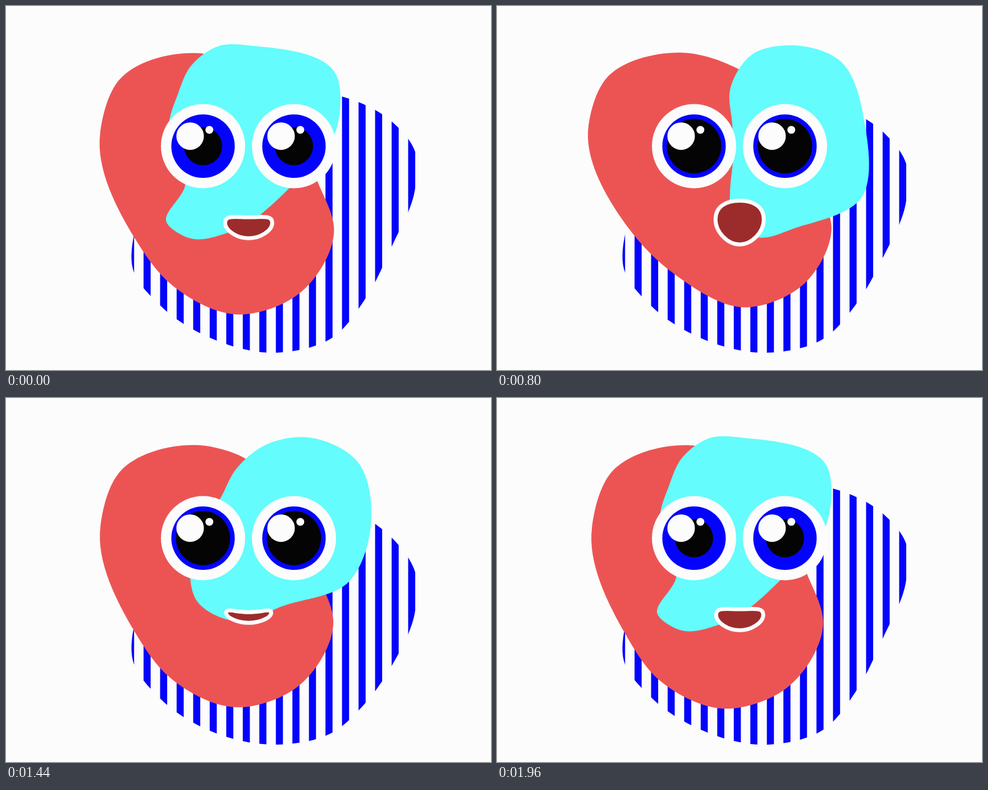
Animation of 864 by 648 pixels, one loop 2 s. Source, as an HTML page with a canvas:

```html
<!DOCTYPE html>
<html lang="en">
<head>
<meta charset="utf-8">
<title>Morphing face</title>
<style>
  html, body { margin: 0; width: 100%; height: 100%; overflow: hidden; background: #fcfcfc; }
  canvas { display: block; }
</style>
</head>
<body>
<canvas id="stage" width="864" height="648"></canvas>
<script>
const ctx = document.getElementById('stage').getContext('2d');
const LOOP = 2000, STEP = 40;
const PAPER = '#fcfcfc', RED = '#ec5454', CYAN = '#64fcfc', BLUE = '#0404fc',
      BLACK = '#040404', MAROON = '#9c2c2c', LASH = '#2c0404', LOWER_LID = '#bc3c3c';

// Key points (x, y) of closed smooth curves
const backdrop = [545,148, 628,164, 687,197, 729,250, 729,313, 687,419, 640,517, 582,589,
  485,617, 363,590, 274,532, 226,468, 229,403, 330,270, 440,180];

const redLow = [340,84, 204,132, 169,232, 228,419, 290,503, 404,553, 520,513, 581,400, 553,315, 407,98];
const redHigh = [330,83, 192,130, 162,212, 236,393, 318,472, 452,534, 552,491, 598,392, 570,320, 425,110];

const tail = [440,71, 380,71, 330,106, 305,160, 291,204, 319,320,
  286,385, 326,413, 400,402, 505,324, 590,215, 588,122];
const lean = [480,69, 415,75, 360,102, 318,155, 270,222, 275,295,
  272,370, 320,410, 410,372, 470,328, 608,240, 617,133];
const horn = [585,74, 512,113, 483,172, 383,140, 257,212, 238,300,
  300,362, 385,392, 520,356, 620,327, 655,195, 635,105];
const side = [526,70, 455,86, 415,150, 419,210, 421,260, 415,335,
  417,387, 465,412, 532,395, 650,340, 656,215, 608,95];
const wide = [548,70, 470,79, 400,101, 330,153, 260,212, 240,262,
  262,334, 345,383, 440,345, 555,312, 637,237, 643,130];

// Mouths: half width, then heights of top, corner pull, sides and bottom
const grin = [42, 376, 372, 386, 413.5];
const lens = [34, 371.5, 372, 380, 394.5];
const gasp = [34, 362, 363, 381, 414.5];
const shout = [43, 346.5, 358, 380, 424.5];
const pout = [16.5, 379, 379.5, 383, 387];
const smile = [64, 382, 368, 381, 413.5];

// Tracks: [time, values]
const patch = [[0, tail], [320, lean], [520, horn], [800, side], [1240, side], [1640, wide], [1960, tail]];
const mouth = [[0, grin], [320, lens], [520, gasp], [800, shout], [1240, pout], [1640, smile], [1960, grin]];
const redLift = [[0, [.2]], [540, [1]], [1700, [0]], [1960, [0]]];
const sag = [[0, [9]], [420, [0]], [800, [28]], [1240, [70]], [1640, [31]], [1960, [9]]];
const pupil = [[0, [34]], [320, [36]], [520, [46]], [1240, [50]], [1640, [44.5]], [1960, [34]]];
const blink = [[0, [0]], [1000, [0]], [1200, [1]], [1280, [1]], [1480, [0]]];

// Monotone cubic interpolation on a cyclic track
function at(track, t) {
  const n = track.length;
  const key = k => {
    const [time, vals] = track[(k + n) % n];
    return [time + LOOP * Math.floor(k / n), vals];
  };
  let i = n - 1;
  while (track[i][0] > t) i--;
  const [p, a, b, q] = [i - 1, i, i + 1, i + 2].map(key);
  const span = b[0] - a[0], s = (t - a[0]) / span;
  const slope = (u, v, j) => (v[1][j] - u[1][j]) / (v[0] - u[0]);
  const bend = (m, k) => m * k > 0 ? 2 * m * k / (m + k) : 0;
  return a[1].map((v, j) => {
    const m = slope(a, b, j);
    const m0 = bend(slope(p, a, j), m) * span, m1 = bend(m, slope(b, q, j)) * span;
    return v + s * m0 + s * s * (3 * m * span - 2 * m0 - m1) + s * s * s * (m0 + m1 - 2 * m * span);
  });
}

// Closed curve through the points, with tangents weighted by distance
function blob(flat) {
  const n = flat.length / 2;
  const pt = i => { const k = (i + n) % n; return [flat[2 * k], flat[2 * k + 1]]; };
  const dist = (a, b) => Math.hypot(b[0] - a[0], b[1] - a[1]);
  const tangent = i => {
    const a = pt(i - 1), b = pt(i), c = pt(i + 1), l0 = dist(a, b), l1 = dist(b, c);
    return [0, 1].map(k => ((b[k] - a[k]) / l0 * l1 + (c[k] - b[k]) / l1 * l0) / (l0 + l1));
  };
  ctx.beginPath();
  ctx.moveTo(...pt(0));
  for (let i = 0; i < n; i++) {
    const a = pt(i), b = pt(i + 1), h = dist(a, b) / 3, u = tangent(i), v = tangent(i + 1);
    ctx.bezierCurveTo(a[0] + u[0] * h, a[1] + u[1] * h, b[0] - v[0] * h, b[1] - v[1] * h, ...b);
  }
  ctx.closePath();
}

function fill(color) {
  ctx.fillStyle = color;
  ctx.fill();
}

function disc(x, y, r, color) {
  ctx.beginPath();
  ctx.arc(x, y, r, 0, 2 * Math.PI);
  fill(color);
}

function drawBackdrop(t) {
  const [depth] = at(sag, t);
  // The right side sinks, while the left and the bottom stay in place
  const sunk = backdrop.map((v, i) => {
    if (i % 2 === 0) return v;
    const pull = (backdrop[i - 1] - 230) / 500;
    return v + depth * pull * Math.min(.75 + v / 700, (617 - v) / 170);
  });
  ctx.save();
  blob(sunk);
  ctx.clip();
  ctx.fillStyle = BLUE;
  for (let i = 0; i < 18; i++) ctx.fillRect(215.6 + 29.46 * i, 0, 12.6, 648);
  ctx.restore();
}

function lid(left, bend, right, far, shift, color) {
  ctx.beginPath();
  ctx.moveTo(-77, far);
  ctx.lineTo(-77, left + shift);
  ctx.quadraticCurveTo(0, bend + shift, 77, right + shift);
  ctx.lineTo(77, far);
  fill(color);
}

function eye(x, flip, t) {
  const [r] = at(pupil, t), [shut] = at(blink, t);
  ctx.save();
  ctx.translate(x, 249.5);
  disc(0, 0, 75, PAPER);
  disc(0, 0, 56.5, BLUE);
  disc(0, 0, r, BLACK);
  disc(-23, -17.8, 24.5, PAPER);
  disc(11.3, -29, 7, PAPER);
  if (shut > 0) {
    ctx.beginPath();
    ctx.arc(0, 0, 75, 0, 2 * Math.PI);
    ctx.clip();
    ctx.scale(flip, 1);
    const up = (shut - 1) * 100, down = (1 - shut) * 60;
    lid(37, 17, 30, 140, down, LASH);
    lid(40, 20, 33, 140, down, LOWER_LID);
    lid(20, .5, 13.5, -190, up, LASH);
    lid(4, -18, -2, -190, up, MAROON);
  }
  ctx.restore();
}

function drawMouth(t) {
  const [half, top, pull, mid, bottom] = at(mouth, t), low = (mid + bottom) / 2;
  ctx.save();
  ctx.translate(432.3, 0);
  ctx.beginPath();
  ctx.moveTo(0, top);
  ctx.bezierCurveTo(.6 * half, top, half, pull, half, mid);
  ctx.bezierCurveTo(half, low, half / 2, bottom, 0, bottom);
  ctx.bezierCurveTo(-half / 2, bottom, -half, low, -half, mid);
  ctx.bezierCurveTo(-half, pull, -.6 * half, top, 0, top);
  ctx.closePath();
  fill(MAROON);
  ctx.lineWidth = Math.min(7, half * .21);
  ctx.strokeStyle = PAPER;
  ctx.stroke();
  ctx.restore();
}

function draw(t) {
  ctx.fillStyle = PAPER;
  ctx.fillRect(0, 0, 864, 648);
  drawBackdrop(t);
  const [lift] = at(redLift, t);
  blob(redLow.map((v, i) => v + (redHigh[i] - v) * lift));
  fill(RED);
  blob(at(patch, t));
  fill(CYAN);
  eye(351, 1, t);
  eye(513, -1, t);
  drawMouth(t);
}

const start = performance.now();
function tick() {
  const t = Math.floor((performance.now() - start) % LOOP / STEP) * STEP;
  draw(t < 80 ? 0 : t);  // the first pose is held for two steps
  requestAnimationFrame(tick);
}
tick();
</script>
</body>
</html>
```
